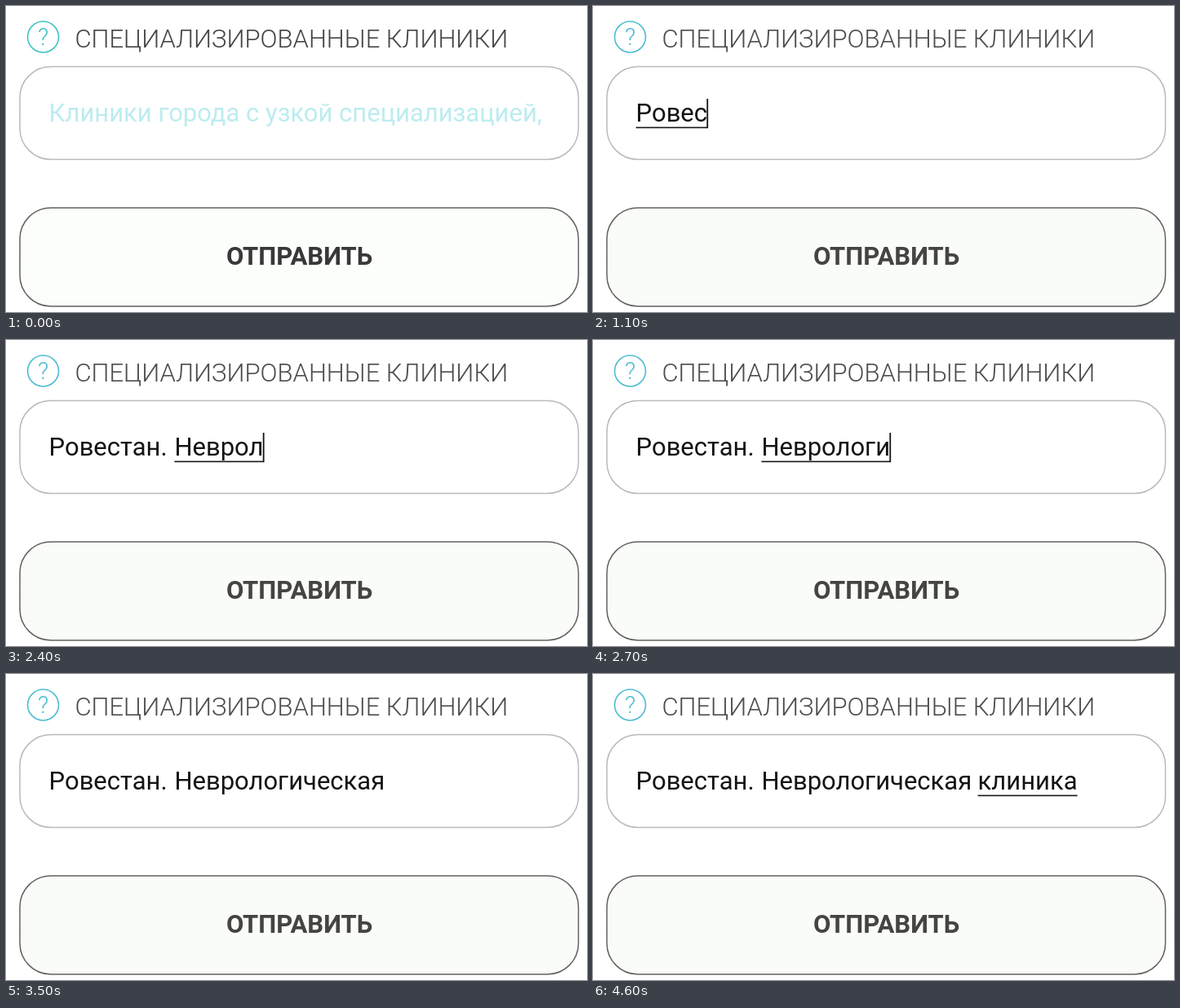
These frames come from a looping animation (712 by 376 pixels, 4.7 s). An HTML page:

```html
<!DOCTYPE html>
<html lang="ru">
<meta charset="utf-8">
<style>
  html, body { margin: 0; width: 100%; height: 100%; overflow: hidden; background: #fff; }
  svg { display: block; font: 31px Roboto, sans-serif; }
  .box { stroke-width: 1.5; }
</style>
<svg width="712" height="376">
  <g id="help">
    <circle cx="45.5" cy="38" r="19" fill="none" stroke="currentColor" stroke-width="1.6"/>
    <text x="45.5" y="47.5" text-anchor="middle" font-size="29" font-weight="300" fill="currentColor">?</text>
  </g>
  <text id="title" x="84.4" y="50.7" font-weight="300">СПЕЦИАЛИЗИРОВАННЫЕ КЛИНИКИ</text>

  <rect class="box" x="17" y="74.5" width="684.5" height="114" rx="38" fill="#fff" stroke="#bababa"/>
  <svg x="52.6" y="100" width="604" height="60">
    <text id="hint" y="42.3" fill="#bcecf0">Клиники города с узкой специализацией,</text>
  </svg>
  <g fill="#141414">
    <text class="word" x="52.6" y="142.3"></text>
    <text class="word" x="206.4" y="142.3"></text>
    <text class="word" x="471.6" y="142.3"></text>
    <rect id="line" y="148.6" height="1.6"/>
    <rect id="caret" y="114" width="1.8" height="36.2"/>
  </g>

  <rect id="button" class="box" x="17" y="248" width="684.5" height="121" rx="38" stroke="#62625e"/>
  <text id="send" x="359.6" y="318" text-anchor="middle" font-weight="700">ОТПРАВИТЬ</text>
</svg>
<script>
const $ = id => document.getElementById(id);
const fields = [...document.querySelectorAll('.word')];
const words = ['Ровестан.', 'Неврологическая', 'клиника'];

// Moment of each keystroke, spaces included, in tenths of a second
const keys = [7, 8, 9, 10, 11, 12, 13, 13, 15, 16,
  18, 19, 21, 22, 23, 24, 25, 26, 27, 28, 29, 29, 30, 31, 32, 33,
  38, 39, 40, 41, 42, 43, 43];

const show = (el, on) => el.setAttribute('visibility', on ? 'visible' : 'hidden');

function draw(t) {
  const typed = keys.filter(k => k <= t).length;
  let start = 0, current = 0;
  words.forEach((word, i) => {
    if (typed >= start) current = i;
    fields[i].textContent = word.slice(0, Math.max(0, typed - start));
    start += word.length + 1;
  });

  const field = fields[current];
  const x = +field.getAttribute('x');
  const width = field.textContent ? field.getComputedTextLength() : 0;
  $('line').setAttribute('x', x);
  $('line').setAttribute('width', width);
  show($('line'), !field.textContent.endsWith('.'));
  $('caret').setAttribute('x', x + width - 0.7);
  show($('caret'), t >= 4 && t < 35 || t >= 38 && t < 46);
  show($('hint'), !typed);

  $('help').style.color = t < 5 ? '#42c3c6' : '#4dbdd0';
  $('title').style.fill = t < 5 ? '#444' : '#4c4c4c';
  $('button').style.fill = t < 1 ? '#fcfefb' : '#fafcf9';
  $('send').style.fill = t < 1 ? '#383838' : '#444540';
}

const begin = performance.now();
function tick() {
  draw(Math.floor((performance.now() - begin) % 4700 / 100));
  requestAnimationFrame(tick);
}
tick();
</script>
</html>
```
